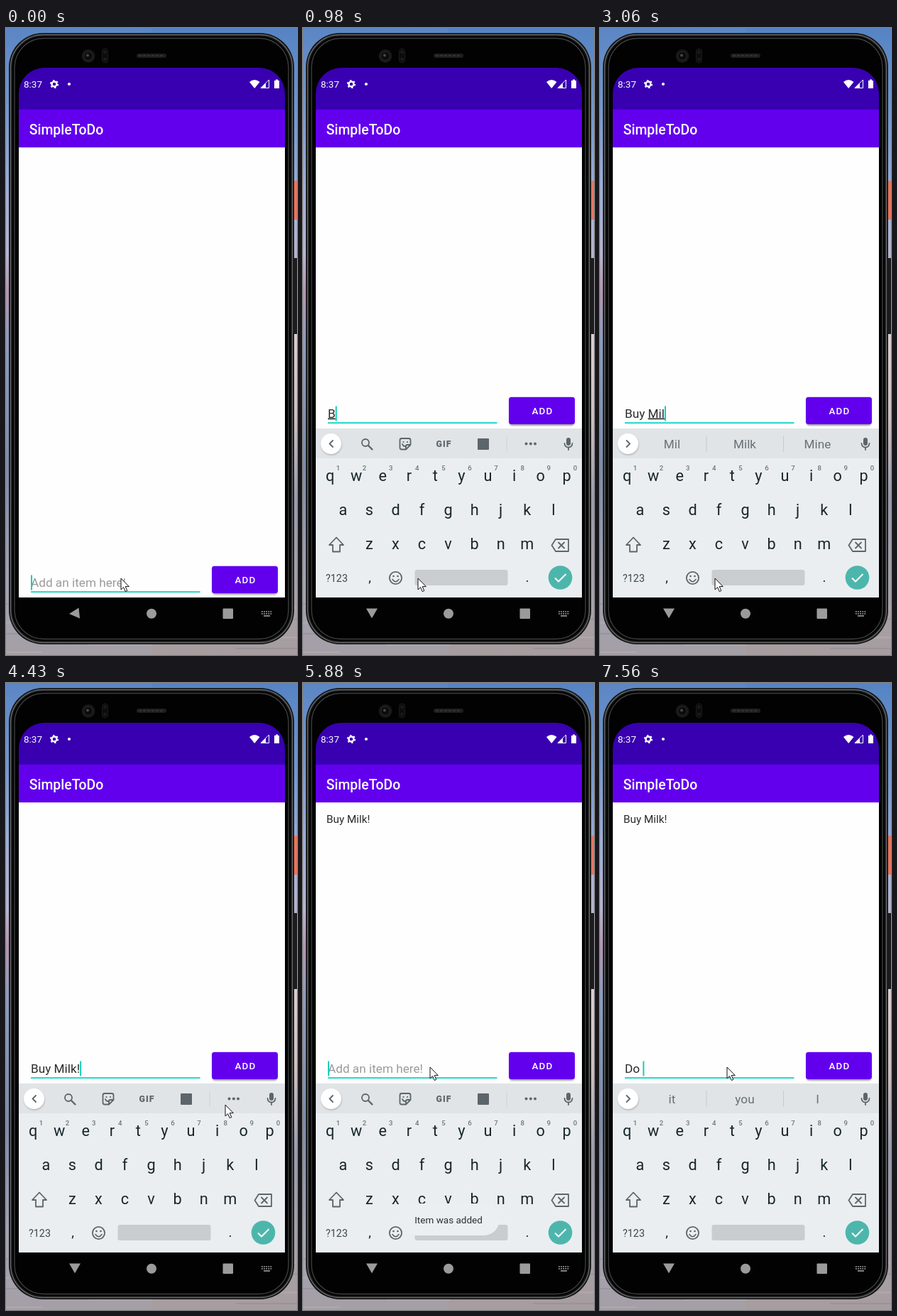
Recreate the animation shown at these times as an HTML page. Size 410x883 px, loop 8000 ms.

```html
<!DOCTYPE html>
<html lang="en">
<head>
<meta charset="utf-8">
<title>To-do app</title>
<style>
html, body { margin: 0; width: 100%; height: 100%; overflow: hidden; background: #000; }
svg { display: block; width: 100%; height: 100%; }
text { font-family: Roboto, "Noto Sans", sans-serif; white-space: pre; }
.mid { text-anchor: middle; }
.line { fill: none; stroke: #5c656a; stroke-width: 1.8; stroke-linejoin: round; stroke-linecap: round; }
</style>
</head>
<body>
<svg id="stage" viewBox="0 0 410 883" preserveAspectRatio="none"></svg>
<script>
const LOOP = 8000;
const stage = document.getElementById('stage');

const rect = (x, y, w, h, fill, rx = 0, more = '') =>
  `<rect x="${x}" y="${y}" width="${w}" height="${h}" fill="${fill}" rx="${rx}" ${more}/>`;
const dot = (x, y, r, fill, more = '') => `<circle cx="${x}" cy="${y}" r="${r}" fill="${fill}" ${more}/>`;
const path = (d, more) => `<path d="${d}" ${more}/>`;
const label = (x, y, size, fill, str, more = '') =>
  `<text x="${x}" y="${y}" font-size="${size}" fill="${fill}" ${more}>${str}</text>`;
const gradient = (id, stops) => `<linearGradient id="${id}" x2="0" y2="1">` +
  stops.map(([at, c]) => `<stop offset="${at}" stop-color="${c}"/>`).join('') + '</linearGradient>';

function backdrop() {
  let water = '';
  for (let i = 0; i < 16; i++) {
    const x = 205 + 200 * Math.sin(i * 2.4);
    water += rect(x - 45, 800 + i * 5.2, 90, 2, i % 2 ? '#c3b3b4' : '#838694', 1, 'opacity=".4"');
  }
  return `<defs>
    ${gradient('skyL', [[0, '#5b86c4'], [.12, '#7396cc'], [.25, '#9daed6'], [.36, '#b6b4d2'], [.42, '#b596b0'],
      [.5, '#8e9cbd'], [.7, '#7e8cab'], [.88, '#a3a3b2'], [1, '#a59fa6']])}
    ${gradient('skyR', [[0, '#5583c3'], [.15, '#7699cf'], [.3, '#a8b4d8'], [.42, '#c5b0bd'], [.49, '#dccdd0'],
      [.62, '#cfbfc0'], [.75, '#9a9bad'], [.9, '#a7a1a8'], [1, '#a79d9f']])}
    <filter id="soft" x="-20%" y="-30%" width="140%" height="170%"><feGaussianBlur stdDeviation="1.2"/></filter>
  </defs>` + rect(0, 0, 205, 883, 'url(#skyL)') + rect(205, 0, 205, 883, 'url(#skyR)') + water;
}

function phone() {
  return rect(405, 215, 6, 55, '#e8745f', 1) + rect(405, 324, 6, 107, '#1c1c1e', 1) +
    rect(4, 7, 402, 861, '#161616', 48) +
    rect(6.5, 9.5, 397, 856, 'none', 46, 'stroke="#656869" stroke-width="1.4"') +
    rect(9, 12, 392, 851, '#020202', 43) +
    rect(12, 14.5, 386, 846, 'none', 41, 'stroke="#3c3e3f" stroke-width="1.4"') +
    dot(116, 39.5, 9.5, '#171717') + dot(116, 39.5, 6, '#0b0b0c', 'stroke="#2a2a2a" stroke-width="1"') +
    dot(115, 38.5, 2, '#44484c') +
    rect(135.5, 29, 8, 20, '#0c0c0c', 4, 'stroke="#1b1b1b"') + dot(139.5, 34, 2.4, '#1a1a1a') + dot(139.5, 44, 2.4, '#1a1a1a') +
    rect(184, 36, 42, 6, '#1e1e1e', 3) +
    path('M187 39H223', 'stroke="#333" stroke-width="2" stroke-dasharray="4 2"');
}

function appBars() {
  const gear = dot(68, 79, 3.5, 'none', 'stroke="#fff" stroke-width="2.4"') +
    dot(68, 79, 5.2, 'none', 'stroke="#fff" stroke-width="1.8" stroke-dasharray="2.4 3.045"');
  return rect(18, 168, 375, 634, '#fefefe') +
    path('M18 115V92A36 36 0 0 1 54 56H357A36 36 0 0 1 393 92V115Z', 'fill="#3800b1"') +
    rect(18, 114.8, 375, 53.4, '#6200ee') +
    label(25, 84, 13.5, '#fff', '8:37') + gear + dot(89, 79, 2.1, '#fff') +
    path('M343 76Q350 70 357.500 76L350.200 85Z', 'fill="#fff"') +
    path('M370.500 73V84.500H359Z', 'fill="none" stroke="#fff" stroke-width="1"') +
    path('M366 77.500V84.500H359Z', 'fill="#fff"') +
    path('M378 74H380V72.500H383V74H385V85H378Z', 'fill="#fff"') +
    label(32.8, 149.8, 19.4, '#fff', 'SimpleToDo', 'font-weight="500"') +
    label(33, 197, 15.3, '#2b2b2b', 'Buy Milk!', 'id="item"');
}

// Laid out for the raised position; the group moves down without the keyboard.
function entry() {
  return `<g id="entry">
    ${label(35, 548.5, 17.2, '#9b9b9b', 'Add an item here!', 'id="hint"')}
    <text y="548.5" x="35" font-size="17.2" fill="#2b2b2b" id="typed"><tspan id="done"></tspan><tspan id="word" text-decoration="underline"></tspan></text>
    ${rect(35, 555.2, 238.5, 1.9, '#17d5c5')}
    ${rect(35, 532.5, 2, 21, '#17cdbd', 0, 'id="caret"')}
    ${rect(291, 522, 91, 38, '#000', 4, 'opacity=".38" filter="url(#soft)"')}
    ${rect(290, 519.7, 93, 38.3, '#6200ee', 3.5)}
    ${rect(290, 519.7, 93, 38.3, '#fff', 3.5, 'id="ripple"')}
    ${label(337.5, 544.3, 13.4, '#fff', 'ADD', 'class="mid" font-weight="500" letter-spacing="1.2"')}
  </g>`;
}

function keyboard() {
  const ink = '#19262c', grey = '#5c656a';
  const row = (keys, x, y) => [...keys].map((k, i) =>
    label(x + i * 37.05, y, 21.7, ink, k, 'class="mid"')).join('');
  const digits = [...'1234567890'].map((d, i) =>
    label(49.5 + i * 37.1, 622.5, 9.6, '#6d767b', d, 'class="mid" font-weight="500"')).join('');
  const tools = dot(88, 584, 5, 'none', 'class="line"') + path('M92 588L97.500 593.500', 'class="line" style="stroke-width:2.4"') +
    path('M139 578H149Q151.500 578 151.500 580.500V587L145 593.500H139Q136.500 593.500 136.500 591V580.500Q136.500 578 139 578ZM151 587H147Q145 587 145 589V593M140 586Q141 589 143.500 589', 'class="line"') +
    dot(141.5, 583, 1.1, grey) + dot(147, 583, 1.1, grey) +
    label(198.5, 590, 12.3, grey, 'GIF', 'class="mid" font-weight="900" letter-spacing="1"') +
    rect(246, 578, 16, 16, grey, 1) + rect(286.5, 575, 1, 22, '#cdd2d5') +
    [314.5, 320.8, 327].map(x => dot(x, 585.5, 2, grey)).join('');
  const words = [101.5, 204, 306.5].map((x, i) =>
    label(x, 591.5, 17.2, '#687176', '', `class="mid" id="sug${i}"`)).join('') +
    rect(149.5, 574, 1, 23, '#c6cbce') + rect(258, 574, 1, 23, '#c6cbce');
  const mic = rect(371, 577, 6, 11, grey, 3) + path('M368.500 585Q369 590.500 374 590.500T379.500 585M374 591V594', 'class="line"');
  return `<g id="kb">
    ${rect(18, 564, 375, 238, '#eaeef1')}${rect(18, 564, 375, 42, '#e0e4e7')}
    ${dot(40, 587, 14.5, '#000', 'opacity=".2" filter="url(#soft)"')}${dot(39.5, 585.5, 14.5, '#fff')}
    ${path('M42 581L37.500 585.500L42 590', 'class="line" id="chev"')}
    <g id="tools">${tools}</g><g id="words">${words}</g>${mic}
    ${row('qwertyuiop', 38.2, 637.5)}${digits}
    ${row('asdfghjkl', 56.4, 685.5)}${row('zxcvbnm', 93.4, 734)}
    ${path('M47 717.500L57 728H52V737.500H42V728H37Z', 'class="line"')}
    ${path('M356 720H374V737H356L350.500 728.500ZM360 724.500L368 732.500M368 724.500L360 732.500', 'class="line"')}
    ${label(47.5, 780, 14.3, '#3c474c', '?123', 'class="mid"')}
    ${label(94, 780, 19, ink, ',', 'class="mid"')}${label(316, 780, 19, ink, '.', 'class="mid"')}
    ${dot(130.5, 774.5, 8.6, 'none', 'class="line"')}
    ${dot(127.5, 772, 1.3, grey)}${dot(133.5, 772, 1.3, grey)}
    ${path('M126 776.500Q130.500 783 135 776.500', 'class="line" style="stroke-width:1.6"')}
    ${rect(157.5, 763, 131, 22, '#c9cdd0', 3)}
    ${dot(362.5, 774, 16.8, '#4db6ac')}
    ${path('M355 774.500L360 779.500L370.500 769', 'fill="none" stroke="#fff" stroke-width="2"')}
  </g>`;
}

function navBar() {
  let keys = '';
  for (let i = 0; i < 10; i++) keys += rect(360 + (i % 5) * 3.1, 821 + (i > 4) * 3, 1.8, 1.8, '#8d8d8d');
  return path('M89 825L102.500 816.500L104 831.500Z', 'id="back" fill="#9b9b9b"') +
    path('M89 817.500H105L97 831.300Z', 'id="hide" fill="#9b9b9b"') +
    dot(205, 824.7, 7, '#9b9b9b') + rect(305.5, 817.5, 14.5, 14.5, '#9b9b9b', 1) +
    keys + rect(363, 827, 9, 1.8, '#8d8d8d');
}

stage.innerHTML = backdrop() + phone() + appBars() + entry() + keyboard() +
  `<g id="toast">${rect(135, 733, 142, 45, '#ebeff1', 22.5)}${label(205, 761, 13.5, '#2b3033', 'Item was added', 'class="mid"')}</g>` +
  navBar() +
  path('M0 0V16L3.600 12.600L6.200 18.600L8.800 17.500L6.200 11.600H11.300Z',
    'id="mouse" fill="#fff" stroke="#111" stroke-width="1" stroke-linejoin="round"');

const ui = {};
stage.querySelectorAll('[id]').forEach(el => ui[el.id] = el);

// time, committed text, word being composed, suggestions, caret visible
const typing = [
  [0, '', '', '', 1],
  [980, '', 'B', '', 1],
  [1110, '', 'Bu', 'But,Bu,Buy', 1],
  [1240, '', 'Buy', 'But,Bu,Buy', 1],
  [1370, '', 'Buy', 'Buy,But,Buying', 1],
  [1930, '', 'Buy', 'Buy,But,Buying', 0],
  [2080, 'Buy ', '', 'it,the,a', 1],
  [2480, 'Buy ', 'M', 'it,the,a', 1],
  [2620, 'Buy ', 'M', 'M,My,Me', 1],
  [2770, 'Buy ', 'Mi', 'M,My,Me', 1],
  [2920, 'Buy ', 'Mi', 'Mi,Mine,Miss', 1],
  [3060, 'Buy ', 'Mil', 'Mil,Milk,Mine', 1],
  [3200, 'Buy ', 'Milk', 'Milk,Mil,Mill', 1],
  [3740, 'Buy ', 'Milk', 'Milk,Mil,Mill', 0],
  [4050, 'Buy Milk!', '', '', 1],
  [4700, 'Buy Milk!', '', '', 0],
  [4960, '', '', '', 1],
  [5480, '', '', '', 0],
  [5880, '', '', '', 1],
  [6370, '', '', '', 0],
  [6850, '', 'D', '', 1],
  [6990, '', 'D', 'D,Do,Did', 1],
  [7130, '', 'Do', 'D,Do,Did', 1],
  [7270, '', 'Do', 'Do,Don,Dog', 1],
  [7420, 'Do ', '', 'Do,Don,Dog', 1],
  [7560, 'Do ', '', 'it,you,I', 1]
];
const pointer = [
  [0, 162, 775], [4190, 205, 722], [4310, 268, 648], [4430, 309, 594], [4560, 326, 564], [4700, 333, 543],
  [5480, 318, 527], [5610, 262, 520], [5750, 205, 532], [5880, 179, 541]
];

const at = (list, t) => list.findLast(s => s[0] <= t);
const show = (el, on) => el.style.display = on ? '' : 'none';
const ramp = (t, a, b) => Math.min(1, Math.max(0, (t - a) / (b - a)));

function draw(t) {
  const [, done, word, sug, caret] = at(typing, t);
  const [, mx, my] = at(pointer, t);
  const open = t >= 150;

  ui.done.textContent = done;
  ui.word.textContent = word;
  show(ui.hint, !done && !word);
  show(ui.caret, caret);
  const width = done || word ? ui.typed.getComputedTextLength() : 0;
  ui.caret.setAttribute('x', 35 + width);
  ui.entry.setAttribute('transform', `translate(0 ${open ? 0 : 238})`);

  show(ui.kb, open);
  ui.kb.setAttribute('transform', `translate(0 ${t < 290 ? 1 : 0})`);
  show(ui.hide, open);
  show(ui.back, !open);
  show(ui.tools, !sug);
  show(ui.words, sug);
  sug.split(',').forEach((s, i) => ui['sug' + i].textContent = s);
  ui.chev.setAttribute('d', sug ? 'M37.5 581L42 585.5L37.5 590' : 'M42 581L37.5 585.5L42 590');

  show(ui.item, t >= 4960);
  ui.ripple.setAttribute('opacity', .22 * ramp(t, 4800, 4900) * (1 - ramp(t, 5080, 5480)));
  ui.toast.setAttribute('opacity', ramp(t, 5080, 5350) * (1 - ramp(t, 6850, 7130)));
  ui.mouse.setAttribute('transform', `translate(${mx} ${my})`);
}

function tick(now) {
  draw(now % LOOP);
  requestAnimationFrame(tick);
}
draw(0);
requestAnimationFrame(tick);
</script>
</body>
</html>
```
